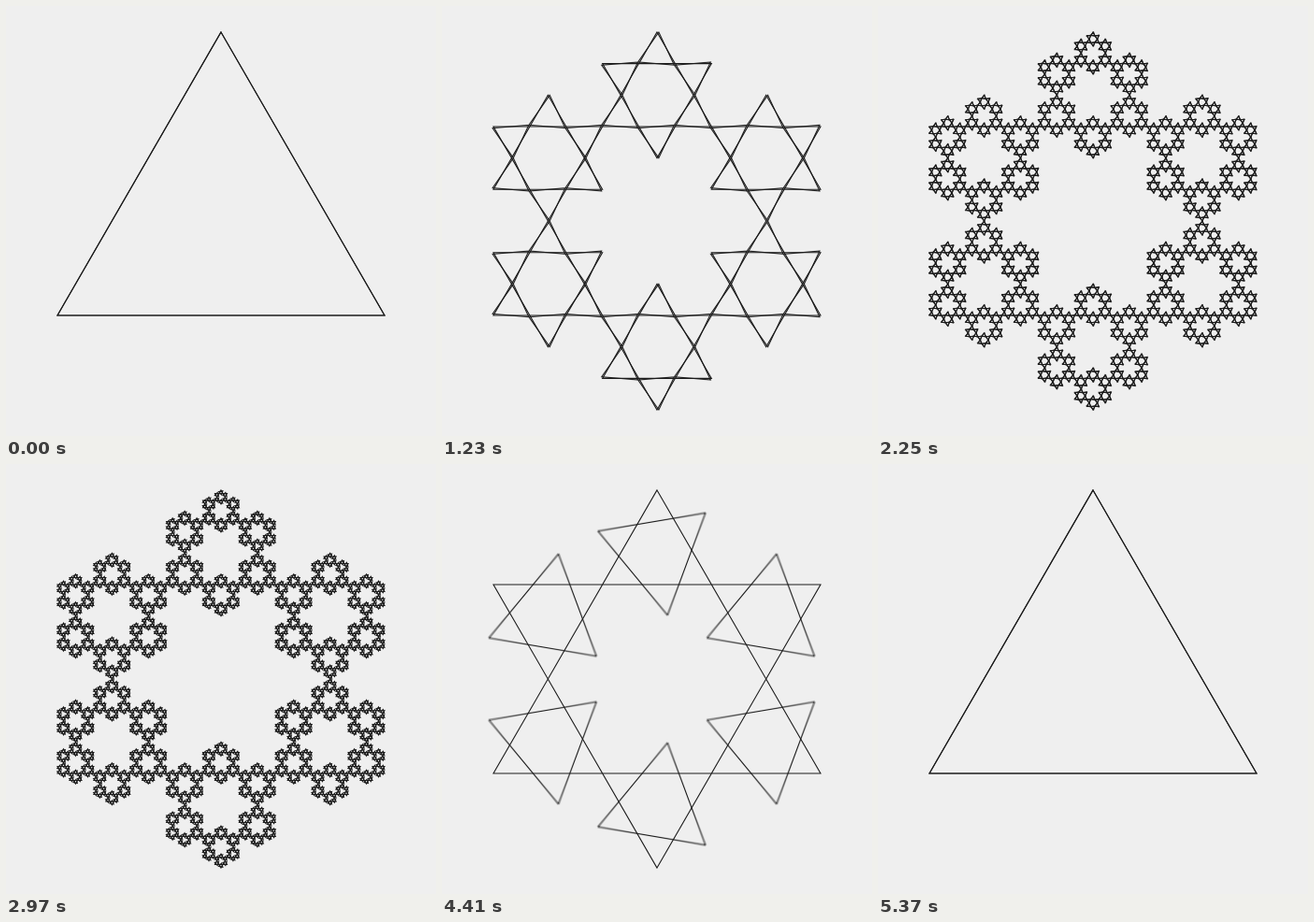
Animation, 460 px wide and 460 px high, one loop 5.4 s. Source, as an HTML page with a canvas:

```html
<!DOCTYPE html>
<html>
<head>
<meta charset="utf-8">
<style>
html, body { margin: 0; width: 100%; height: 100%; overflow: hidden; background: #efefef; }
canvas { display: block; }
</style>
</head>
<body>
<canvas id="stage" width="460" height="460"></canvas>
<script>
const SIZE = 460, LOOP = 5400, STEP = 30, LEVELS = 5;
const SAMPLES = 6, SHUTTER = 0.5;
const RADIUS = 350 / Math.sqrt(3);
const BG = '#efefef', INK = '#1c1c1c';

const view = document.getElementById('stage').getContext('2d');
const layer = document.createElement('canvas');
layer.width = layer.height = SIZE;
const pen = layer.getContext('2d');

const ease = (p, g) => p < 0.5 ? 0.5 * (2 * p) ** g : 1 - 0.5 * (2 - 2 * p) ** g;

// Each star is replaced by six triangles at its tips, alternately up and down.
const split = ({ x, y, r }) => [0, 1, 2, 3, 4, 5].map(i => {
  const a = i * Math.PI / 3 - Math.PI / 2;
  return {
    x: x + r * 2 / 3 * Math.cos(a),
    y: y + r * 2 / 3 * Math.sin(a),
    r: r / 3,
    dir: i % 2 ? -1 : 1
  };
});

const levels = [[{ x: SIZE / 2, y: SIZE / 2, r: RADIUS, dir: 1 }]];
while (levels.length < LEVELS) levels.push(levels.at(-1).flatMap(split));

// Downward triangles are mirrored, so they turn the other way.
function trianglePath(list, turn) {
  const path = new Path2D();
  const corners = [0, 1, 2].map(i => {
    const a = turn + i * Math.PI * 2 / 3;
    return [Math.sin(a), -Math.cos(a)];
  });
  for (const { x, y, r, dir } of list) {
    corners.forEach(([cx, cy], i) =>
      path[i ? 'lineTo' : 'moveTo'](x + r * cx, y + r * cy * dir));
    path.closePath();
  }
  return path;
}

const fixed = levels.map(list => trianglePath(list, 0));

function drawMoment(ms) {
  const there = 1 - Math.abs(1 - (ms % LOOP) / (LOOP / 2));
  const u = LEVELS * ease(there, 1.25);
  const k = Math.min(LEVELS - 1, Math.floor(u));
  const turn = ease(u - k, 2.5) * Math.PI / 3;
  pen.fillStyle = BG;
  pen.fillRect(0, 0, SIZE, SIZE);
  pen.strokeStyle = INK;
  pen.lineWidth = 1.1;
  pen.stroke(fixed[k]);
  pen.stroke(trianglePath(levels[k], turn));
}

// Motion blur: average several moments while the shutter is open.
function drawFrame(ms) {
  for (let i = 0; i < SAMPLES; i++) {
    drawMoment(ms + STEP * SHUTTER * i / SAMPLES);
    view.globalAlpha = 1 / (i + 1);
    view.drawImage(layer, 0, 0);
  }
}

const start = performance.now();
let last = -1;
function tick() {
  const frame = Math.floor(((performance.now() - start) % LOOP) / STEP);
  if (frame !== last) drawFrame(frame * STEP);
  last = frame;
  requestAnimationFrame(tick);
}
tick();
</script>
</body>
</html>
```
